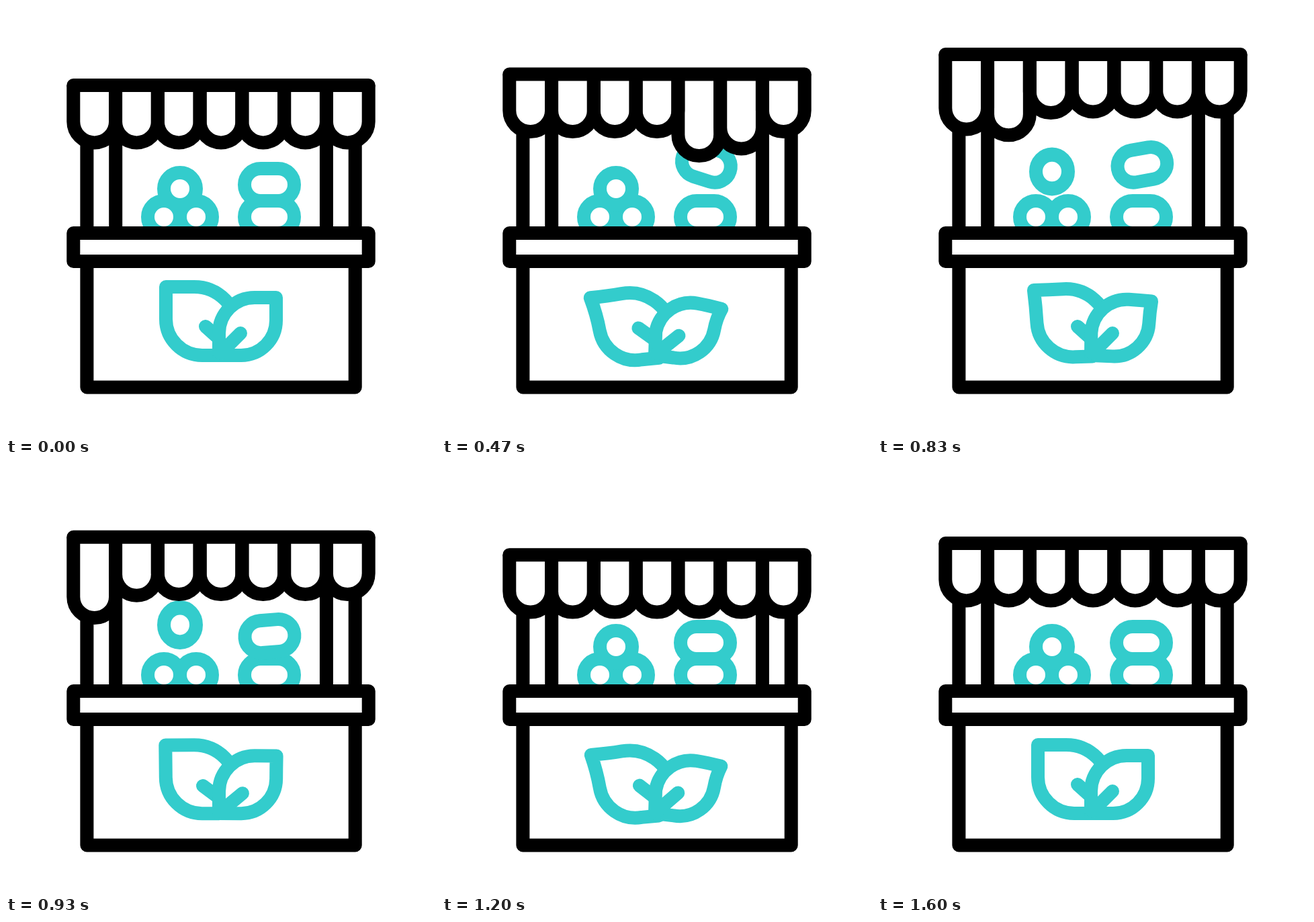
These frames come from a looping animation (640 px wide and 640 px high, 2000 ms). An HTML page with a canvas:

```html
<!DOCTYPE html>
<html lang="en">
<head>
<meta charset="utf-8">
<title>Market stall</title>
<style>
  html, body { margin: 0; width: 100%; height: 100%; overflow: hidden; background: #fff; }
  canvas { display: block; width: 640px; height: 640px; }
</style>
</head>
<body>
<canvas id="stage" width="640" height="640"></canvas>
<script>
const ctx = document.getElementById('stage').getContext('2d');
const TEAL = '#33cccc';
const LOOP = 2000;
const PI = Math.PI;

// Motion tracks: [time in ms, value], eased between stops
const ROOF_Y = [[360, 118], [675, 56.5], [745, 56.5], [1060, 137.5], [1090, 137.5], [1600, 118]];
const SCALLOP_DROP = [[0, 0], [97, 36], [150, 36], [280, 0]];
const BEAN_LIFT = [[267, 0], [640, 56.5], [1040, 0]];
const BEAN_TILT = [[230, 0], [630, 28], [830, -10], [1030, 0]];
const BERRY_LIFT = [[650, 0], [915, 33], [1180, 0]];
const LEAF_SWING = [[333, 0], [600, 21], [915, 0], [1090, 13], [1430, 0]];
const VEIN_SWING = [[333, 0], [630, 15], [833, 0], [1030, 10.5], [1330, 0]];

function track(t, keys) {
  if (t <= keys[0][0]) return keys[0][1];
  for (let i = 1; i < keys.length; i++) {
    const [t0, v0] = keys[i - 1], [t1, v1] = keys[i];
    if (t < t1) {
      const u = (t - t0) / (t1 - t0);
      return v0 + (v1 - v0) * u * u * (3 - 2 * u);
    }
  }
  return keys[keys.length - 1][1];
}

function line(...points) {
  ctx.beginPath();
  points.forEach(([x, y]) => ctx.lineTo(x, y));
  ctx.stroke();
}

function placed(x, y, degrees, draw) {
  ctx.save();
  ctx.translate(x, y);
  ctx.rotate(degrees * PI / 180);
  draw();
  ctx.restore();
}

function berry(x, y, stretch = 1) {
  ctx.save();
  ctx.translate(x, y);
  ctx.scale(1, stretch);
  ctx.beginPath();
  ctx.arc(0, 0, 24, 0, 2 * PI);
  ctx.stroke();
  ctx.restore();
}

function bean(x, y, tilt) {
  placed(x, y, tilt, () => {
    ctx.beginPath();
    ctx.arc(-13, 0, 24, PI / 2, -PI / 2);
    ctx.arc(13, 0, 24, -PI / 2, PI / 2);
    ctx.closePath();
    ctx.stroke();
  });
}

function fruit(t) {
  ctx.strokeStyle = TEAL;
  const berryLift = track(t, BERRY_LIFT), beanLift = track(t, BEAN_LIFT);
  berry(235, 314);
  berry(283, 314);
  berry(259, 272 - berryLift, 1 + berryLift * 0.0022);
  bean(392, 314, 0);
  bean(392 + beanLift * 0.045, 266 - beanLift, track(t, BEAN_TILT));
}

function scallop(i, y, drop) {
  const left = 100.3 + i * 62.77, r = 31.38;
  const path = new Path2D();
  path.moveTo(left, y);
  path.lineTo(left, y + 54 + drop);
  path.arc(left + r, y + 54 + drop, r, PI, 0, true);
  path.lineTo(left + 2 * r, y);
  return path;
}

function roof(t) {
  const y = track(t, ROOF_Y);
  ctx.strokeStyle = '#000';
  [120.4, 163.2, 476.9, 519.7].forEach(x => line([x, y + 60], [x, 338]));
  // The ripple runs from the right edge to the left
  const scallops = Array.from({ length: 7 }, (_, i) =>
    scallop(i, y, track(t - 170 - (6 - i) * 100, SCALLOP_DROP)));
  scallops.forEach(s => ctx.fill(s));
  scallops.forEach(s => ctx.stroke(s));
  ctx.lineCap = 'round';
  line([100.3, y], [539.7, y]);
}

function counter() {
  ctx.strokeStyle = '#000';
  ctx.fillRect(100, 338, 440, 42);
  line([120.4, 380], [120.4, 567.4], [519.7, 567.4], [519.7, 380]);
  ctx.beginPath();
  ctx.rect(100.3, 338, 439.4, 42);
  ctx.stroke();
}

// Both leaves hinge at the stem; the body shrinks away from the tip as they swing
function leaves(t) {
  const swing = track(t, LEAF_SWING), bend = swing / 20;
  const veinSwing = track(t, VEIN_SWING);
  ctx.strokeStyle = TEAL;
  ctx.lineCap = 'round';

  placed(317, 520, -swing, () => {
    const dx = 9 * bend, dy = 5 * bend;
    ctx.beginPath();
    ctx.arc(dx - 37, dy - 37, 65, 0, -PI / 2, true);
    ctx.quadraticCurveTo(dx - 58, dy - 102, -79, -102);
    ctx.quadraticCurveTo(dx - 79, dy - 78, dx - 79, dy - 54);
    ctx.arc(dx - 25, dy - 54, 54, PI, PI / 2, true);
    ctx.lineTo(10 * bend, 9 * bend);
    ctx.stroke();
  });
  placed(317, 520, -veinSwing, () => line([-20, -43], [10, -16]));

  placed(317, 520, swing, () => {
    const dx = -10 * bend, dy = -3 * bend;
    ctx.beginPath();
    ctx.moveTo(0, 0);
    ctx.arc(dx + 53, dy - 33, 53, PI, -PI / 2);
    ctx.quadraticCurveTo(dx + 69, dy - 86, 85, -86);
    ctx.quadraticCurveTo(dx + 85, dy - 69, dx + 85, dy - 52);
    ctx.arc(dx + 33, dy - 52, 52, 0, PI / 2);
    ctx.closePath();
    ctx.fill();
    ctx.stroke();
  });
  placed(317, 520, veinSwing, () => line([32, -33], [2, -3]));
}

function draw(t) {
  ctx.fillStyle = '#fff';
  ctx.fillRect(0, 0, 640, 640);
  ctx.lineWidth = 20;
  ctx.lineJoin = 'round';
  ctx.lineCap = 'butt';
  fruit(t);
  roof(t);
  counter();
  leaves(t);
}

function tick() {
  // Thirty steps a second
  const t = performance.now() % LOOP;
  draw(Math.floor((t + 4) * 0.03) / 0.03);
  requestAnimationFrame(tick);
}
tick();
</script>
</body>
</html>
```
